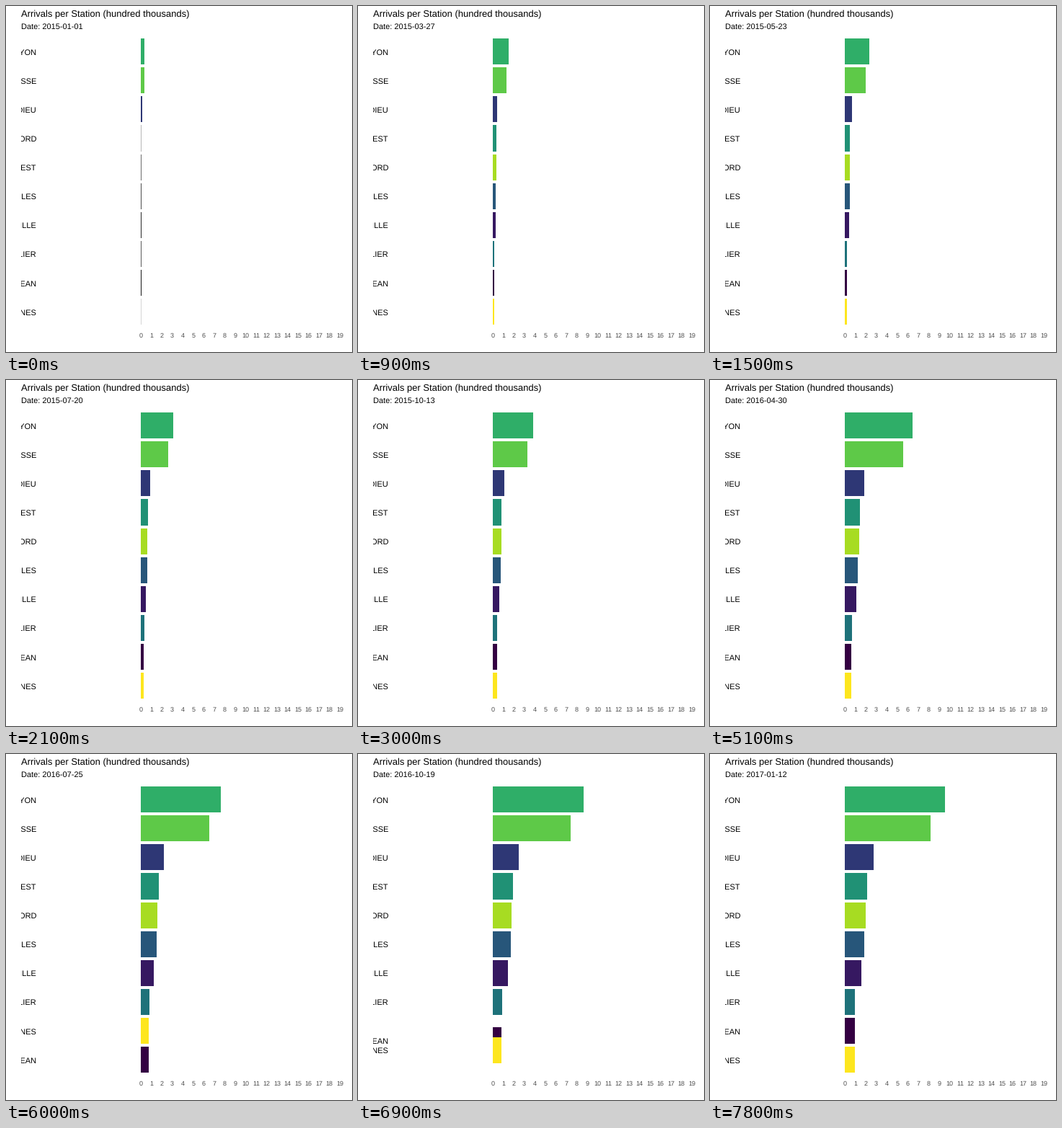
Write a matplotlib script that moves like this. It is 480 by 480 pixels and loops after 8000 ms.

```python
import numpy as np
import matplotlib as mpl
import matplotlib.pyplot as plt
from matplotlib.animation import FuncAnimation
from matplotlib.colors import to_rgb
from matplotlib.patches import Rectangle

mpl.rcParams.update({
    "font.family": "Liberation Sans",
    "text.hinting": "none",
    "text.hinting_factor": 1,
    "toolbar": "None",
})

SIZE = 480
BASE_X, UNIT = 187, 14.53
ROW_Y, PITCH, BAR_H = 63.1, 40.13, 36.1
TICKS_PER_STEP, TICK_MS, TICKS = 3, 100, 80

# name, length relative to the leader, colour
STATIONS = [
    ("PARIS LYON", 1.0, "#2fae68"),
    ("PARIS MONTPARNASSE", 0.855, "#5ec948"),
    ("LYON PART DIEU", 0.288, "#2e3775"),
    ("PARIS EST", 0.223, "#209175"),
    ("PARIS NORD", 0.209, "#a7dc22"),
    ("MARSEILLE ST CHARLES", 0.195, "#27567a"),
    ("LILLE", 0.165, "#361861"),
    ("MONTPELLIER", 0.104, "#1e727a"),
    ("BORDEAUX ST JEAN", 0.099, "#340042"),
    ("RENNES", 0.099, "#fde61e"),
]
EST, NORD, JEAN, RENNES = 3, 4, 8, 9

LEADER_STEPS = [0, 3, 7, 10, 14, 20, 21, 26]
LEADER_WIDTHS = [5.3, 22, 45, 56, 78, 111, 117, 139]


def grey(color):
    return (np.dot(to_rgb(color), (0.299, 0.587, 0.114)),) * 3


def rows_at(step):
    rows = np.arange(len(STATIONS), dtype=float)
    early = np.interp(step, [0, 1], [1, 0])
    late = np.interp(step, [17, 18, 22, 23, 24], [0, 1, 1, 1 / 3, 0])
    for upper, lower, amount in [(EST, NORD, early), (JEAN, RENNES, late)]:
        rows[upper] += amount
        rows[lower] -= amount
    return rows


fig = plt.figure(figsize=(SIZE / 72, SIZE / 72), dpi=72, facecolor="white")
ax = fig.add_axes([0, 0, 1, 1])
ax.set(xlim=(0, SIZE), ylim=(SIZE, 0))
ax.axis("off")

ax.text(21, 15, "Arrivals per Station (hundred thousands)", size=13.2)
date_text = ax.text(21, 32, "", size=11)
for value in range(20):
    ax.text(BASE_X + UNIT * value, 460, str(value), size=8.8,
            color="#4d4d4d", ha="center")

panel = Rectangle((21, 40), SIZE - 21, 410, transform=ax.transData)
bars, labels = [], []
for name, _, color in STATIONS:
    bars.append(ax.add_patch(Rectangle((BASE_X, 0), 1, BAR_H, fc=color, lw=0)))
    label = ax.text(42, 0, name, size=11, ha="right")
    label.set_clip_path(panel)
    label.set_clip_on(True)
    labels.append(label)


def update(tick):
    step = tick // TICKS_PER_STEP
    day = np.datetime64("2015-01-01") + 200 * step // 7
    date_text.set_text(f"Date: {day}")
    leader = np.interp(step, LEADER_STEPS, LEADER_WIDTHS)
    for (_, share, color), row, bar, label in zip(
            STATIONS, rows_at(step), bars, labels):
        width = max(1, round(leader * share))
        center = ROW_Y + PITCH * row
        bar.set_y(center - BAR_H / 2)
        bar.set_width(width)
        # hairline bars lose their hue
        bar.set_facecolor(grey(color) if width == 1 else color)
        label.set_y(center + 4.3)
    return [date_text, *bars, *labels]


anim = FuncAnimation(fig, update, frames=TICKS, interval=TICK_MS,
                     repeat=True, repeat_delay=0, blit=False)
plt.show()
```
